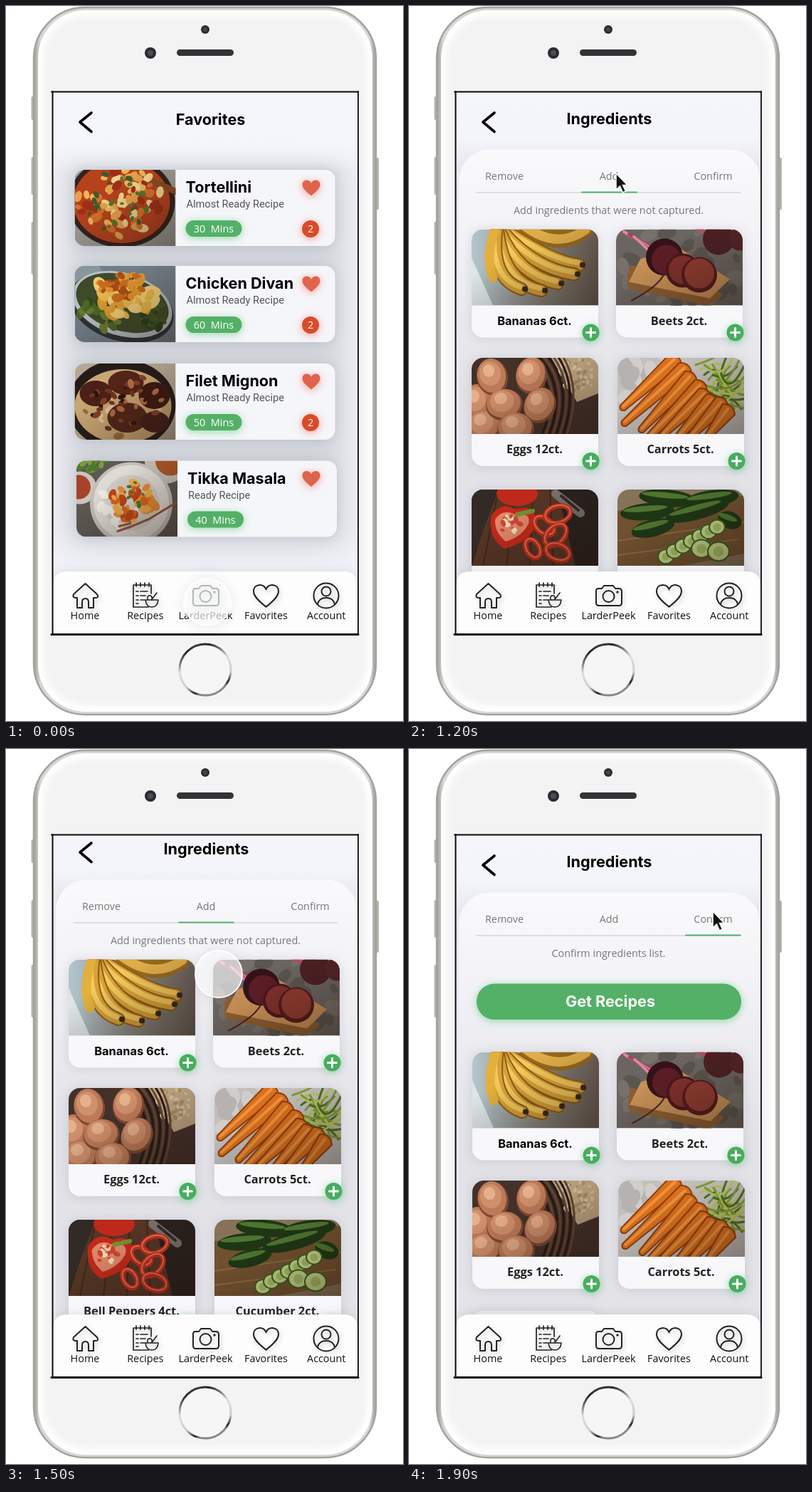
An HTML page that plays this animation: 558 px wide and 1004 px high, repeating every 2900 ms.

```html
<!DOCTYPE html>
<html lang="en">
<head>
<meta charset="utf-8">
<style>
html, body { margin: 0; width: 100%; height: 100%; overflow: hidden; background: #fff; }
svg { display: block; }
text { white-space: pre; }
.title { font: 700 21.6px Inter, sans-serif; }
.sub { font: 14.6px Roboto, sans-serif; fill: #555; }
.body { font: 14.4px "Open Sans", sans-serif; }
.label { font: 700 16.4px "Open Sans", sans-serif; fill: #222; }
.alt { font: 700 16.4px Inter, sans-serif; }
.mid { text-anchor: middle; }
.soft { filter: drop-shadow(0 1px 8px #5a5f7030); }
.red { filter: drop-shadow(0 2px 6px #ff4a3a80); }
.green { filter: drop-shadow(0 2px 6px #4fc27190); }
.icon { filter: drop-shadow(2px 3px 3px #0003); }
</style>
</head>
<body>
<svg id="stage" width="558" height="1004" viewBox="0 0 558 1004">
  <defs>
    <clipPath id="screen"><rect x="66" y="121" width="428" height="761"/></clipPath>
    <clipPath id="lens"><rect x="66" y="181" width="428" height="603"/></clipPath>
    <clipPath id="wide"><rect width="366" height="107" rx="14"/></clipPath>
    <clipPath id="tile"><rect width="178" height="152" rx="16"/></clipPath>
    <filter id="blur" x="-30%" y="-30%" width="160%" height="160%"><feGaussianBlur stdDeviation="22"/></filter>
    <filter id="edge"><feGaussianBlur stdDeviation="5"/></filter>
    <linearGradient id="metal"><stop stop-color="#9f9e99"/><stop offset=".02" stop-color="#d8d7d4"/><stop offset=".98" stop-color="#d8d7d4"/><stop offset="1" stop-color="#9f9e99"/></linearGradient>
    <linearGradient id="ring" x2=".35" y2="1"><stop stop-color="#777"/><stop offset=".18" stop-color="#222"/><stop offset=".5" stop-color="#ddd"/><stop offset=".8" stop-color="#ccc"/><stop offset=".95" stop-color="#222"/><stop offset="1" stop-color="#888"/></linearGradient>
    <linearGradient id="panel" x2="0" y2="1"><stop stop-color="#fafafc"/><stop offset=".2" stop-color="#f1f1f5"/><stop offset=".45" stop-color="#e2e2e7"/><stop offset="1" stop-color="#e4e4e9"/></linearGradient>
    <linearGradient id="head" x2="0" y2="1"><stop stop-color="#f5f6fb"/><stop offset=".6" stop-color="#f4f5fa"/><stop offset="1" stop-color="#e6e7ee"/></linearGradient>
    <linearGradient id="fade" x2="0" y2="1"><stop stop-color="#f5f6fb"/><stop offset=".6" stop-color="#f5f6fb"/><stop offset="1" stop-color="#f5f6fb" stop-opacity="0"/></linearGradient>
    <linearGradient id="cold" x2="0" y2="1"><stop stop-color="#c3d3dc"/><stop offset=".45" stop-color="#dde8ee"/><stop offset="1" stop-color="#a5b8c5"/></linearGradient>
    <linearGradient id="wall"><stop stop-color="#c3d4dd"/><stop offset=".15" stop-color="#e2edf2"/><stop offset=".6" stop-color="#f6fbfc"/><stop offset=".88" stop-color="#e2edf2"/><stop offset="1" stop-color="#c3d4dd"/></linearGradient>
    <linearGradient id="door" x2="0" y2="1"><stop stop-color="#dde4e8"/><stop offset=".6" stop-color="#c6d1d8"/><stop offset="1" stop-color="#aebcc6"/></linearGradient>
    <linearGradient id="table"><stop stop-color="#b3c6cd"/><stop offset=".5" stop-color="#8b8982"/><stop offset="1" stop-color="#6b6158"/></linearGradient>
    <linearGradient id="shade" x2="1" y2="1"><stop offset=".3" stop-color="#20120a" stop-opacity="0"/><stop offset="1" stop-color="#20120a" stop-opacity=".4"/></linearGradient>
    <radialGradient id="glow"><stop stop-color="#fff"/><stop offset="1" stop-color="#fff" stop-opacity="0"/></radialGradient>
  </defs>
  <g id="phone"></g>
  <g id="view"></g>
</svg>
<script>
const $ = id => document.getElementById(id);
const el = (x, y, rx, ry, fill, turn = 0, more = '') =>
  `<ellipse cx="${x}" cy="${y}" rx="${rx}" ry="${ry}" fill="${fill}" transform="rotate(${turn} ${x} ${y})" ${more}/>`;
const dot = (x, y, r, fill, more) => el(x, y, r, r, fill, 0, more);
const box = (x, y, w, h, fill, r = 0, more = '') =>
  `<rect x="${x}" y="${y}" width="${w}" height="${h}" rx="${r}" fill="${fill}" ${more}/>`;
const line = (d, color, w = 2) =>
  `<path d="${d}" fill="none" stroke="${color}" stroke-width="${w}" stroke-linecap="round" stroke-linejoin="round"/>`;
const shape = (d, fill, more = '') => `<path d="${d}" fill="${fill}" ${more}/>`;
const text = (x, y, s, cls, more = '') => `<text x="${x}" y="${y}" class="${cls}" ${more}>${s}</text>`;
const at = (x, y, s) => `<g transform="translate(${x} ${y})">${s}</g>`;
const group = (cls, s) => `<g class="${cls}">${s}</g>`;
const clip = (id, s) => `<g clip-path="url(#${id})">${s}</g>`;
const photo = (w, s) => `<svg width="${w}" height="107">${s}${box(0, 0, w, 107, 'url(#shade)')}</svg>`;

// n small ellipses scattered inside an ellipse
function scatter(n, x, y, rx, ry, size, colors) {
  let seed = n * 971 + x * 13 + 7, out = '';
  const rnd = () => (seed = seed * 16807 % 2147483647) / 2147483647;
  rnd(); rnd();
  for (let i = 0; i < n; i++) {
    const a = rnd() * 6.283, r = Math.sqrt(rnd()), s = size * (.6 + .8 * rnd());
    out += el((x + rx * r * Math.cos(a)).toFixed(1), (y + ry * r * Math.sin(a)).toFixed(1),
      s.toFixed(1), (s * .65).toFixed(1), colors[i % colors.length], Math.round(rnd() * 180));
  }
  return out;
}

const dishes = {
  tortellini: box(0, 0, 142, 107, '#9c9d98') + el(66, 45, 75, 64, '#33221d') + el(66, 45, 68, 58, '#b5421d') +
    line('M100 12L150 34', '#8a4a25', 9) +
    scatter(70, 64, 45, 60, 50, 7, ['#edb65a', '#f3d38d', '#d6702c', '#e4a24a', '#9e2f14']) +
    scatter(26, 62, 45, 50, 42, 4, ['#3d5c26', '#56762d']),
  divan: box(0, 0, 142, 107, '#717e87') + el(5, 15, 34, 30, '#87979b') + el(66, 58, 75, 47, '#2d3236', 17) +
    el(67, 54, 72, 44, '#b6c0c5', 17) + el(67, 52, 67, 39, '#3f4a2a', 17) +
    scatter(34, 38, 64, 32, 25, 6, ['#4b6825', '#2f4a1a', '#6a7a30']) +
    scatter(24, 108, 66, 20, 25, 6, ['#3c5a20', '#29401a']) +
    scatter(48, 70, 43, 40, 29, 10, ['#e6b64a', '#f0cd76', '#dc9a31']) +
    scatter(38, 66, 28, 34, 18, 6, ['#c66a1d', '#dd902e', '#a84c16']),
  filet: box(0, 0, 142, 107, '#b4a793') + el(66, 58, 76, 64, '#241c19') + el(68, 60, 68, 52, '#c8a673') +
    scatter(25, 68, 60, 55, 43, 6, ['#e0c795', '#9b6c3e', '#5e371f']) +
    el(30, 42, 23, 18, '#4b2017') + el(72, 27, 25, 17, '#542418') + el(112, 45, 22, 19, '#3e1912') +
    el(74, 76, 28, 21, '#54261a') + el(113, 82, 20, 15, '#45201a') +
    scatter(34, 70, 52, 52, 38, 5, ['#2d120d', '#854029', '#6e3522', '#b36c43']),
  tikka: box(0, 0, 142, 107, '#5c5953') + scatter(20, 24, 2, 20, 12, 6, ['#4e7a2b', '#789c3f']) +
    dot(5, 38, 23, '#cbc4bb') + dot(3, 37, 17, '#a6432a') + dot(126, 2, 30, '#c4beb5') + dot(132, 0, 21, '#a85527') +
    dot(77, 60, 58, '#c3beb7') + dot(77, 59, 53, '#dedad4') + dot(77, 59, 39, '#cfcbc4') +
    scatter(42, 58, 64, 28, 29, 6, ['#efede5', '#d8d5cc']) +
    scatter(46, 80, 56, 32, 27, 7, ['#d9641e', '#bd4618', '#e78a31', '#efaa4b']) +
    scatter(9, 78, 49, 22, 20, 3, ['#4f742e']) +
    line('M73 94L102 82L145 56M60 92L76 88M58 99L78 92', '#93553a', 3)
};

const banana = (x, y, cx, cy) => {
  const d = `M36 -6Q${cx} ${cy} ${x} ${y}`;
  return line(d, '#8a5c18', 19) + line(d, '#d9a136', 15) + at(-2, -3, line(d, '#f3c95c', 7)) + dot(x + 5, y, 4, '#36291c');
};
const egg = (x, y, turn) => el(x, y, 22, 26, '#7d4932', turn) + el(x - 1, y - 2, 20, 24, '#bd7a58', turn) +
  el(x - 3, y - 5, 15, 17, '#d0906c', turn) + el(x - 5, y - 9, 8, 9, '#e6b08c', turn);
const carrot = (x, y, tx, ty) => shape(`M${x - 9} ${y - 7}Q${x + 6} ${y - 8} ${x + 8} ${y + 8}L${tx + 4} ${ty + 4}Q${tx - 4} ${ty + 5} ${tx - 2} ${ty - 3}Z`, '#d9701c', 'stroke="#8f3d0c" stroke-width="2"') +
  line(`M${x - 2} ${y}L${tx + 2} ${ty - 2}`, '#f0923c', 4);
const cuke = (x, y, w, turn) => el(x, y, w, 12, '#1d3614', turn) + el(x - 3, y - 4, w * .82, 4, '#4d7530', turn);
const slice = (x, y, r = 12) => el(x, y, r, r * .9, '#33611c') + el(x, y, r - 2, r * .76, '#c7d58b') + dot(x, y, r * .45, '#a4bd64');
const loop = (x, y, r, turn) => el(x, y, r, r * .65, 'none', turn, 'stroke="#c42d1c" stroke-width="7"') +
  el(x, y - 1, r, r * .65, 'none', turn, 'stroke="#ec6f52" stroke-width="2"');

const foods = {
  bananas: box(0, 0, 178, 107, 'url(#table)') + shape('M0 40L30 107H0Z', '#dde5e6') +
    line('M75 -2Q120 32 160 3M100 -4Q130 18 150 -4', '#96691c', 19) + line('M75 -4Q120 29 160 1', '#dfad48', 13) +
    banana(151, 50, 110, 45) + banana(144, 63, 85, 55) + banana(121, 76, 62, 64) + banana(98, 86, 42, 75) +
    banana(70, 84, 24, 68) + line('M34 -4Q18 40 30 68', '#e2b03c', 13),
  beets: box(0, 0, 178, 107, '#6b6561') + scatter(30, 90, 55, 92, 55, 12, ['#77716b', '#5a5550']) +
    shape('M20 50L150 90Q148 100 126 107L20 84Q12 78 20 50Z', '#8d5e30') + shape('M34 42L88 26L160 70L132 97L18 74Z', '#c99257') +
    [0, 7, 14, 21].map(i => line(`M${4 + i} ${i / 2}Q35 18 50 ${24 + i / 2}`, i % 2 ? '#d98aa5' : '#b23a5e', 4)).join('') +
    line('M110 -2L140 8M122 -6L156 8', '#bb4b64', 6) + dot(144, 14, 22, '#4c2024') + dot(174, 14, 16, '#552328') +
    dot(68, 39, 26, '#341218') + dot(71, 43, 21, '#5c1d26') + dot(94, 58, 24, '#4c171b') + dot(94, 57, 20, '#80302b') +
    dot(117, 64, 25, '#54191b') + dot(117, 62, 21, '#8f3b30') + line('M22 100Q60 80 68 62', '#512028', 2),
  eggs: box(0, 0, 178, 107, '#43312a') + shape('M112 0H178V50L148 62Z', '#c2a984') + scatter(46, 148, 24, 26, 24, 3, ['#d8c4a1', '#a98d68']) +
    [0, 1, 2, 3, 4, 5, 6, 7].map(i => line(`M${78 + i * 7} -4Q${128 + i * 4} 42 ${98 + i * 5} 110`, i % 2 ? '#674634' : '#241713', 3)).join('') +
    egg(8, 63) + egg(17, 96, 70) + egg(84, 25, 12) + egg(29, 27, -10) + egg(96, 67, 30) + egg(46, 66, 80) + egg(62, 99, 85),
  carrots: box(0, 0, 178, 107, '#c2bfbc') + scatter(30, 45, 30, 55, 40, 13, ['#d0cdca', '#b6b2af']) +
    Array.from({ length: 26 }, (_, i) => line(`M${110 + i % 7 * 6} ${10 + i % 9 * 7}Q${140 + i} ${i * 3} ${146 + i * 2} ${i % 5 * 20 - 8}`, ['#7f9c35', '#b7c75e', '#4a6e22'][i % 3], 3)).join('') +
    carrot(82, 2, 6, 70) + carrot(96, 14, 8, 92) + carrot(104, 26, 32, 101) + carrot(118, 38, 42, 112) +
    carrot(124, 50, 62, 108) + carrot(134, 58, 82, 113) + carrot(148, 62, 100, 112) + carrot(157, 72, 124, 112),
  peppers: box(0, 0, 178, 107, '#2a211e') + shape('M34 0H120L146 107H0Z', '#553525') +
    [0, 1, 2, 3].map(i => line(`M${38 + i * 24} 0L${16 + i * 33} 107`, '#402619', 2)).join('') + shape('M0 0H38L0 100Z', '#332925') +
    line('M118 6L153 33', '#77706c', 12) + line('M126 9L150 29', '#322826', 4) + el(64, 6, 29, 17, '#bd2a1b') +
    shape('M28 36Q42 16 62 28Q90 20 90 44Q88 72 46 83Q22 68 28 36Z', '#c4291a') +
    shape('M33 42Q44 26 61 35Q84 31 80 48Q71 66 48 73Q32 60 33 42Z', '#e0876a') + scatter(18, 55, 48, 17, 13, 4, ['#f8dcb8', '#cf4630']) +
    line('M64 35L86 30', '#719331', 6) + loop(102, 51, 16, 40) + loop(121, 35, 18, -15) + loop(118, 64, 18, -45) + loop(86, 83, 14, 60) + loop(121, 88, 17, 20),
  cucumbers: box(0, 0, 178, 107, '#857259') + shape('M0 30L178 8V90L90 107H0Z', '#70502f') + line('M0 72L178 46M0 92L170 70', '#89683f', 2) +
    cuke(70, 12, 40, 5) + cuke(132, 13, 39, -8) + cuke(42, 31, 38, -5) + cuke(112, 30, 46, -15) + cuke(50, 54, 31, -14) +
    cuke(158, 43, 17, 20) + [0, 1, 2, 3, 4, 5, 6].map(i => slice(68 + i * 12, 94 - 7.5 * i + i * i * .1)).join('') +
    slice(118, 83, 15) + slice(142, 87, 16)
};

const tomato = (x, y, r = 15) => dot(x, y, r, '#a81d10') + dot(x - 1, y - 2, r * .85, '#c92b19') + dot(x - r * .25, y - r * .35, r * .35, '#e86a52') + line(`M${x - 3} ${y - r}h6`, '#4b742c', 2);
const shelf = y => box(108, y, 330, 6, '#f8fcfd', 2) + line(`M110 ${y + 6}H436`, '#a2b8c4', 1);
const drawer = (x, y, w, h, s) => box(x, y, w, h, '#a9b9c4', 4, 'stroke="#6f8696" stroke-width="2"') + s +
  box(x + 7, y + 7, w - 14, h - 14, '#ffffff18', 4, 'stroke="#dfe8ed" stroke-width="2"') +
  line(`M${x + w * .25} ${y + 14}H${x + w * .8}`, '#f3f8fa', 5) + line(`M${x + w * .78} ${y + 14}l10 ${h - 24}M${x + w * .25} ${y + 14}l-5 ${h - 24}`, '#ffffff90', 2);
const jar = (x, y, w, h, fill, lid) => box(x, y, w, h, fill, 5) + box(x + 1, y - 6, w - 2, 10, lid, 2) + box(x, y + h * .35, w, h * .3, '#f3dcc5');
const rack = (x, y, w, h) => box(x, y, w, h, '#eaf1f490', 4, 'stroke="#b4c2ca"');

const fridge = clip('lens',
  box(66, 181, 428, 603, 'url(#cold)') + box(92, 194, 371, 552, '#cfdde5', 6) + box(108, 212, 330, 330, 'url(#wall)', 8) +
  line('M92 194L118 225M463 194L438 225M100 214H452', '#a9bcc7') + el(350, 242, 110, 62, 'url(#glow)') + el(270, 340, 170, 70, 'url(#glow)') +
  el(260, 455, 190, 110, 'url(#glow)') + el(246, 214, 24, 6, '#fff', 0, 'stroke="#cfdde4"') + box(430, 276, 11, 42, '#f7fafb', 4, 'stroke="#c0ccd3"') +
  line('M288 270h20M240 270h14', '#8b9aa3') +
  box(66, 181, 26, 603, '#b3c0c9') + box(66, 200, 17, 470, 'url(#door)', 8) + box(463, 181, 31, 603, '#b3c0c9') + box(471, 200, 23, 470, 'url(#door)', 9) +
  box(66, 181, 428, 9, '#57504d') + line('M92 191V784M463 191V784', '#8496a1', 3) +
  jar(66, 248, 25, 66, '#b8583c', '#29211e') + jar(66, 316, 24, 24, '#3a2f2b', '#29211e') + rack(64, 312, 29, 34) +
  jar(66, 403, 23, 60, '#c3983f', '#b88c42') + rack(64, 433, 36, 34) + el(67, 640, 9, 38, '#d98774') + rack(64, 604, 38, 72) +
  el(486, 270, 15, 17, '#df8c64') + rack(453, 257, 42, 35) + el(484, 452, 15, 15, '#d8a583') + rack(452, 434, 43, 37) +
  box(463, 566, 32, 44, '#b5361f', 8) + box(474, 541, 20, 27, '#e49432', 4) + box(480, 529, 14, 14, '#f5f2ea') + el(484, 640, 16, 36, '#cf6b44') + rack(450, 604, 45, 76) +
  shape('M122 362Q120 280 139 266Q157 274 160 294V362Z', '#3e382f') + scatter(18, 140, 338, 15, 24, 7, ['#c24b23', '#e2b650', '#7c8b3a', '#ece5d6']) +
  shape('M201 350V305Q201 290 210 284V265H226V284Q235 292 235 305V350Z', '#f8fbfc', 'stroke="#d0dce2"') +
  shape('M239 350V305Q239 290 247 284V265H263V284Q271 292 271 305V350Z', '#f8fbfc', 'stroke="#d0dce2"') +
  box(158, 290, 42, 56, '#f4f9fa80', 4) + box(168, 338, 50, 26, '#f28b27', 5) + rack(225, 305, 62, 58) + scatter(34, 256, 335, 27, 26, 8, ['#d0402b', '#e66a4d', '#c42c20']) +
  [0, 1, 2, 3, 4, 5].map(i => line(`M${300 - i % 2 * 5} ${349 - i * 8}Q330 ${340 - i * 8} ${366 - i * 2} ${353 - i * 8}`, ['#c9522f', '#ecbd86', '#c97c48'][i % 3], 9)).join('') +
  box(366, 322, 53, 40, '#eef3f5', 5, 'stroke="#cdd9df"') + box(376, 314, 34, 7, '#a84231', 3) + shelf(363) +
  [[127, 446], [161, 447], [194, 444], [145, 420], [179, 421], [206, 418], [175, 398], [218, 438]].map(p => tomato(p[0], p[1], 17)).join('') +
  line('M216 365V408M342 365V412M238 386h15M306 386h18', '#a6b9c3') + dot(281, 394, 22, '#d9e6ee') + dot(282, 395, 8, '#bb3022') +
  dot(249, 425, 20, '#ecb35c') + dot(248, 430, 12, '#c38a3d') + dot(306, 426, 21, '#f5e3b1') + dot(308, 431, 8, '#c74027') +
  scatter(40, 382, 424, 34, 28, 10, ['#dfe2a2', '#b9c767', '#f0edc6']) + el(357, 438, 17, 22, '#efa11f') + dot(366, 437, 6, '#bd6615') +
  el(405, 440, 21, 21, '#c92c1a') + el(404, 438, 11, 6, '#ecab35') + shelf(460) +
  scatter(70, 207, 502, 56, 31, 12, ['#5d8a26', '#9fbe49', '#c3d67a', '#38601b']) + dot(124, 523, 10, '#27401b') + dot(142, 509, 11, '#39531f') + dot(158, 523, 10, '#20371a') +
  scatter(26, 294, 493, 25, 13, 4, ['#54752c']) + tomato(293, 493, 17) + tomato(287, 519, 16) + tomato(318, 518, 16) + tomato(341, 518, 13) +
  scatter(38, 393, 505, 28, 24, 10, ['#2f531e', '#4b742c', '#25411a']) + shelf(531) +
  drawer(113, 549, 140, 82, scatter(26, 156, 596, 27, 18, 12, ['#d9b440', '#b98f35', '#c9a03a']) + scatter(30, 213, 592, 28, 24, 9, ['#6f8f38', '#97ad50', '#4d6829'])) +
  drawer(258, 549, 178, 82, dot(286, 597, 23, '#e0701f') + dot(323, 597, 24, '#c03a25') + scatter(40, 382, 601, 40, 18, 7, ['#b23323', '#7d2f22', '#55703a'])) +
  drawer(106, 644, 336, 90, box(138, 673, 98, 29, '#b08474', 6) + box(144, 704, 93, 14, '#b98f7f', 5) + box(245, 678, 72, 36, '#7f8888', 6) +
    shape('M320 672H390Q383 707 355 707Q328 706 320 672Z', '#cf9f70')) +
  box(92, 746, 371, 38, '#c2d0d9') + line('M92 747H463M92 768H463', '#8fa1ac', 1) + box(92, 770, 27, 13, '#514b49', 3) + box(430, 770, 37, 13, '#514b49', 3));

const heart = (x, y, w, fill, more = '') => shape(`M0 10C-9 3 -12 -1 -12 -5C-12 -12 -3 -13 0 -7C3 -13 12 -12 12 -5C12 -1 9 3 0 10Z`, fill, `transform="translate(${x} ${y}) scale(${w / 24})" ${more}`);
const back = x => line(`M${x - 1} 150L${x - 17} 163L${x - 1} 176.5`, '#000', 3.6);
const touch = (x, y) => dot(x, y, 33, '#ffffffa8', 'stroke="#fffffff0" stroke-width="2" class="soft"');
const cursor = (x, y) => at(x, y, shape('M0 0V23L5.5 18L9.5 27L13.5 25L9.5 16.5H16Z', '#111', 'stroke="#fff" stroke-width="1.5"'));

const navIcons =
  line('M111.5 811L95 826Q93 831 98 831H100V845H107V837Q107 832 111.5 832Q116 832 116 837V845H123V831H126Q131 831 128 826Z', '#222') +
  line('M200 844H179V813H204V825M183 810v5M189 810v5M195 810v5M201 810v5M183 822h3M189 822h10M183 828h3M189 828h7M183 834h3M189 834h6M183 839h3', '#222', 1.7) +
  line('M196 834H214Q213 844 205 844Q197 844 196 834ZM199 833Q198 827 203 828Q206 829 205 833M206 832L212 824', '#222', 1.6) +
  line('M266 818H271L274 814H287L290 818H295Q299 818 299 822V838Q299 842 295 842H267Q263 842 263 838V822Q263 818 266 818Z', '#222') +
  dot(280.5, 829, 8, 'none', 'stroke="#222" stroke-width="2"') + dot(293, 823, 1.7, '#222') +
  heart(365.5, 829, 35, 'none', 'stroke="#222" stroke-width="1.4"') +
  dot(450, 828, 17.5, 'none', 'stroke="#222" stroke-width="2"') + dot(450, 822, 6.5, 'none', 'stroke="#222" stroke-width="2"') +
  line('M438 840Q440 831 450 831Q460 831 462 840', '#222');
const nav = group('soft', shape('M66 882V814Q66 794 86 794H474Q494 794 494 814V882Z', '#fdfdfe')) + group('icon', navIcons) +
  ['Home', 'Recipes', 'LarderPeek', 'Favorites', 'Account'].map((s, i) => text(111 + i * 84.8, 861, s, 'body mid', 'fill="#111"')).join('');

const frame = s => clip('screen', s) +
  line('M65.5 120V883M64 120.5H495', '#0c0808', 2) + line('M495 120V883', '#0c0808', 1.8) + line('M64 882.5H495', '#0c0808', 3);

function recipe(x, y, name, img, mins, missing) {
  return at(x, y, group('soft', box(0, 0, 366, 107, '#f5f6f9', 14)) + clip('wide', photo(142, img)) +
    text(156, 32, name, 'title') + text(157, 53, missing ? 'Almost Ready Recipe' : 'Ready Recipe', 'sub') +
    group('green', box(156, 71, 79, 23, '#54b067', 11.5)) + text(195.5, 88, mins + '  Mins', 'body mid', 'fill="#fff"') +
    group('red', heart(missing ? 332.5 : 330, 26, 25, '#e0634d')) +
    (missing ? group('red', dot(331.5, 83, 12, '#d94b27')) + text(331.5, 88, missing, 'body mid', 'fill="#fff"') : ''));
}

const favorites = frame(
  box(66, 121, 428, 761, '#f1f3f8') + box(82, 215, 396, 545, '#d3d5dc', 20, 'filter="url(#blur)"') +
  box(66, 121, 428, 110, 'url(#fade)') + back(121) + text(287.5, 167, 'Favorites', 'title mid') +
  recipe(96.5, 230, 'Tortellini', dishes.tortellini, 30, 2) + recipe(96.5, 365, 'Chicken Divan', dishes.divan, 60, 2) +
  recipe(96.5, 502, 'Filet Mignon', dishes.filet, 50, 2) + recipe(99, 638.5, 'Tikka Masala', dishes.tikka, 40) +
  nav + touch(283, 837));

const camera = box(64, 119, 432, 765, '#050505') + fridge + line('M96 136L80 149L96 162', '#ccc', 3) +
  shape('M470 130H481L477 143H486L467 168L470 153H460Z', '#f9a63b', 'stroke="#f9a63b" stroke-linejoin="round" stroke-width="2"') +
  dot(280, 832, 37.5, '#fff') + dot(280, 832, 28.5, '#eee', 'stroke="#aaa" stroke-width="2"') + line('M63 884H495', '#111', 1);

const tabs = {
  Remove: { x: 95, mid: 134, top: 316, hint: 'Remove ingredients that were incorrectly captured.' },
  Add: { x: 243, mid: 281, top: 313.5, hint: 'Add ingredients that were not captured.' },
  Confirm: { x: 389, mid: 427.5, top: 425.5, hint: 'Confirm ingredients list.' }
};
const stock = [[88, 0, 'Bananas 6ct.', 'bananas'], [291, 0, 'Beets 2ct.', 'beets'], [88, 180.5, 'Eggs 12ct.', 'eggs'],
  [293, 180.5, 'Carrots 5ct.', 'carrots'], [88, 365.5, 'Bell Peppers 4ct.', 'peppers'], [293, 365.5, 'Cucumber 2ct.', 'cucumbers']];

function ingredient(x, y, name, key, minus) {
  const mark = line(minus ? 'M161.5 145h12' : 'M161.5 145h12M167.5 139v12', '#fff', 3);
  return at(x, y, group('soft', box(0, 0, 178, 152, '#f8f8fb', 16)) + clip('tile', photo(178, foods[key])) +
    text(88.5, 134, name, key == 'bananas' ? 'alt mid' : 'label mid') +
    group(minus ? 'red' : 'green', dot(167.5, 145, 12, minus ? '#d94b27' : '#48ad60')) + mark);
}

function ingredients(name, scroll, pointer) {
  const tab = tabs[name], done = name == 'Confirm';
  const shown = done ? stock.slice(0, 4) : stock;
  const page = box(66, 121, 428, 110, 'url(#head)') + back(121) + text(281.5, 166, 'Ingredients', 'title mid') +
    box(70, 201.5, 424, 760, 'url(#panel)', 44) +
    Object.keys(tabs).map(s => text(tabs[s].mid, 244, s, 'body mid', 'fill="#777"')).join('') +
    line('M95 262H466', '#d4d5e4', 1.3) + line(`M${tab.x} 261.5h77`, '#52b36b', 1.8) +
    text(280.5, 292, tab.hint, 'body mid', 'fill="#777"') +
    (done ? group('green', box(95, 329.5, 372, 50.5, '#54b067', 25)) + text(283, 362, 'Get Recipes', 'title mid', 'fill="#fff"') +
      group('soft', box(89, 789, 178, 40, '#ececf0', 14)) : '') +
    shown.map(([x, y, s, key]) => ingredient(x + done, tab.top + y, s, key, name == 'Remove')).join('');
  return frame(box(66, 121, 428, 761, '#e9eaf0') + at(0, -scroll, page) + nav + pointer);
}

function view(step) {
  if (step < 5) return favorites;
  if (step < 10) return camera;
  if (step == 10) return ingredients('Remove', 0, touch(267, 352));
  if (step == 11) return ingredients('Remove', 0, cursor(291, 235));
  if (step == 12) return ingredients('Add', 0, cursor(291, 235));
  if (step < 18) {
    const drag = 9 * (1 - Math.cos((step - 13) * Math.PI / 2));
    return ingredients('Add', drag, touch(299, 334 - drag));
  }
  return ingredients(step == 18 ? 'Add' : 'Confirm', 0, cursor(427, 228));
}

$('phone').innerHTML =
  [[127, 33], [212, 53], [303, 74]].map(([y, h]) => box(35.5, y, 6, h, '#b5b4af', 2)).join('') + box(518, 213, 6, 73, '#b5b4af', 2) +
  box(39, 2, 481, 993, 'url(#metal)', 72, 'stroke="#a3a29d" stroke-width="2.5"') + box(45, 6, 470, 985, '#fff', 67) +
  box(53, 14, 454, 968, '#f3f3f4', 60, 'filter="url(#edge)"') +
  dot(280, 33, 6, '#2d2b31') + dot(280, 33, 3, '#46434c') + dot(203, 66, 8, '#2b2a2e') + dot(203, 66, 4, '#4c4a55') +
  box(240, 61, 80, 9, '#333236', 4.5) + dot(280, 932, 36, '#f6f6f7', 'stroke="url(#ring)" stroke-width="3"');

let last = -1;
const start = performance.now();
function tick() {
  const t = (performance.now() - start) % 2900;
  const step = t < 500 ? 0 : t < 1000 ? 5 : Math.min(19, Math.floor(t / 100));
  if (step != last) $('view').innerHTML = view(last = step);
  requestAnimationFrame(tick);
}
tick();
</script>
</body>
</html>
```
